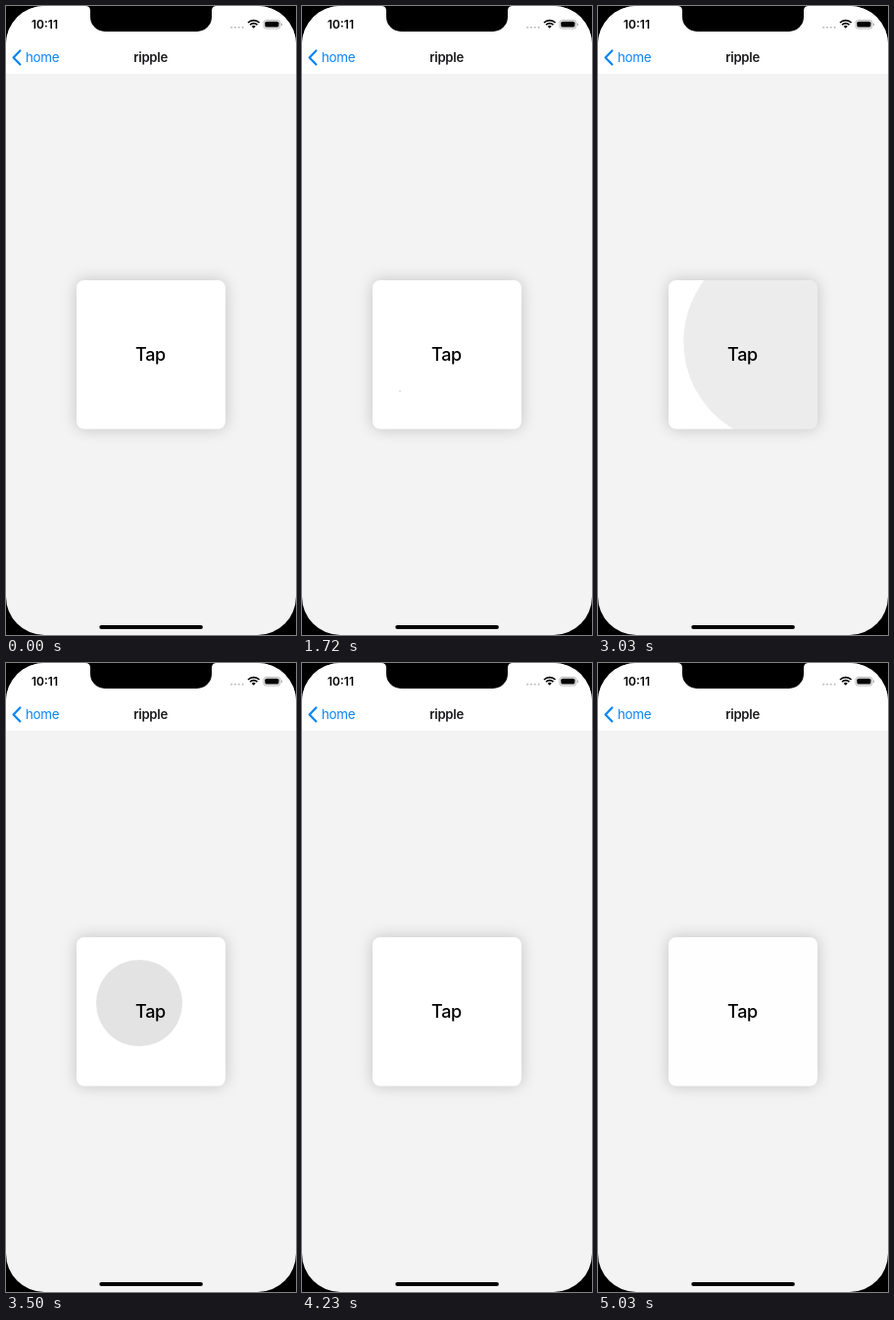
An HTML page with a canvas that plays this animation: 296 px wide and 640 px high, repeating every 5.18 s.

```html
<!DOCTYPE html>
<html lang="en">
<head>
<meta charset="utf-8">
<title>ripple</title>
<style>
  html, body { margin: 0; width: 100%; height: 100%; overflow: hidden; background: #000; }
  canvas { display: block; width: 296px; height: 640px; }
</style>
</head>
<body>
<canvas id="stage"></canvas>
<script>
const W = 296, H = 640, LOOP = 5180;
const GROW = 500, FADE = 300, REACH = 215, ALPHA = 0.14;
const CARD = [72, 279, 152, 151.5, 8];
const BLUE = '#0a84f5';

// The screen refreshes only at these moments.
const ticks = [0, 1180, 1290, 1390, 1500, 1720, 1840, 1940, 2060, 2380, 2480, 2580,
  2800, 2910, 3030, 3150, 3380, 3490, 3600, 3700, 3900, 4010, 4110, 4220, 4330,
  4450, 4570, 4670, 4800, 4910, 5030];

// Touches: start time, position, delay before fading.
const taps = [
  { at: 1140, x: 146, y: 358, hold: 40 },
  { at: 1696, x: 100, y: 392, hold: 50 },
  { at: 2260, x: 177, y: 414, hold: 30 },
  { at: 2785, x: 190.5, y: 341.5, hold: 100 },
  { at: 3330, x: 136, y: 346, hold: 60 },
  { at: 3844, x: 117, y: 383, hold: 60 },
  { at: 4301, x: 180, y: 413, hold: 120 },
  { at: 4730, x: 150, y: 362, hold: 40 }
];

const canvas = document.getElementById('stage');
const ctx = canvas.getContext('2d');
const dpr = window.devicePixelRatio || 1;
canvas.width = W * dpr;
canvas.height = H * dpr;

const ease = p => p < 0.5 ? 2 * p * p : 1 - 2 * (1 - p) ** 2;
const unit = v => Math.min(1, Math.max(0, v));

function box(color, x, y, w, h, r) {
  ctx.fillStyle = color;
  ctx.beginPath();
  ctx.roundRect(x, y, w, h, r);
  ctx.fill();
}

function disc(color, x, y, r) {
  ctx.fillStyle = color;
  ctx.beginPath();
  ctx.arc(x, y, r, 0, Math.PI * 2);
  ctx.fill();
}

function label(text, x, y, size, weight, color, align, spacing) {
  ctx.font = `${weight} ${size}px Inter, Roboto, sans-serif`;
  ctx.letterSpacing = spacing + 'px';
  ctx.textAlign = align;
  ctx.fillStyle = color;
  ctx.fillText(text, x, y);
}

function notch() {
  ctx.fillStyle = '#000';
  ctx.beginPath();
  ctx.moveTo(81, 0);
  ctx.quadraticCurveTo(86, 0, 86, 5);
  ctx.lineTo(86, 10);
  ctx.arcTo(86, 26, 102, 26, 15);
  ctx.arcTo(210, 26, 210, 10, 15);
  ctx.lineTo(210, 5);
  ctx.quadraticCurveTo(210, 0, 215, 0);
  ctx.fill();
}

function wifi(x, y) {
  ctx.strokeStyle = '#000';
  ctx.lineWidth = 1.7;
  for (const r of [8.2, 5.2]) {
    ctx.beginPath();
    ctx.arc(x, y, r, -Math.PI * 0.75, -Math.PI * 0.25);
    ctx.stroke();
  }
  ctx.fillStyle = '#000';
  ctx.beginPath();
  ctx.moveTo(x, y);
  ctx.arc(x, y, 2.9, -Math.PI * 0.75, -Math.PI * 0.25);
  ctx.fill();
}

function battery() {
  ctx.strokeStyle = '#a4a4a4';
  ctx.lineWidth = 0.8;
  ctx.beginPath();
  ctx.roundRect(262.9, 14.4, 17, 8.6, 2.6);
  ctx.stroke();
  box('#000', 264.3, 15.8, 14.2, 5.8, 1.5);
  box('#a4a4a4', 280.8, 17.3, 1.1, 2.9, [0, 1, 1, 0]);
}

function header() {
  box('#fff', 0, 0, W, 69, 0);
  notch();
  label('10:11', 26, 23, 12, 600, '#000', 'left', 0);
  for (let i = 0; i < 4; i++) disc('#bdbdbd', 230.2 + i * 3.8, 21.8, 1);
  wifi(252.8, 22.8);
  battery();
  ctx.strokeStyle = BLUE;
  ctx.lineWidth = 2.2;
  ctx.lineCap = 'round';
  ctx.lineJoin = 'round';
  ctx.beginPath();
  ctx.moveTo(14.4, 45.4);
  ctx.lineTo(7.6, 52.4);
  ctx.lineTo(14.4, 59.4);
  ctx.stroke();
  ctx.lineCap = 'butt';
  label('home', 20, 57, 13.4, 400, BLUE, 'left', -0.35);
  label('ripple', 147.6, 57, 13.2, 600, '#1c1c1e', 'center', -0.3);
}

function ripple(tap, time) {
  const age = time - tap.at;
  if (age <= 0 || age >= tap.hold + FADE) return;
  const radius = REACH * ease(unit(age / GROW));
  const alpha = ALPHA * (1 - ease(unit((age - tap.hold) / FADE)));
  disc(`rgba(0,0,0,${alpha})`, tap.x, tap.y, radius);
}

function card(time) {
  ctx.save();
  ctx.shadowColor = 'rgba(0,0,0,0.2)';
  ctx.shadowBlur = 16 * dpr;
  box('#fff', ...CARD);
  ctx.restore();

  ctx.save();
  ctx.beginPath();
  ctx.roundRect(...CARD);
  ctx.clip();
  taps.forEach(tap => ripple(tap, time));
  ctx.restore();
  label('Tap', 147.4, 361, 18, 500, '#000', 'center', -0.4);
}

function draw(time) {
  ctx.setTransform(dpr, 0, 0, dpr, 0, 0);
  box('#000', 0, 0, W, H, 0);
  ctx.save();
  ctx.beginPath();
  ctx.roundRect(0, 0, W, H, 39);
  ctx.clip();
  box('#f3f3f3', 0, 0, W, H, 0);
  header();
  card(time);
  box('#000', 95.3, 630, 105.6, 4, 2);
  ctx.restore();
}

const start = performance.now();
function loop() {
  const now = (performance.now() - start) % LOOP;
  draw(ticks.findLast(t => t <= now) ?? 0);
  requestAnimationFrame(loop);
}
loop();
</script>
</body>
</html>
```
